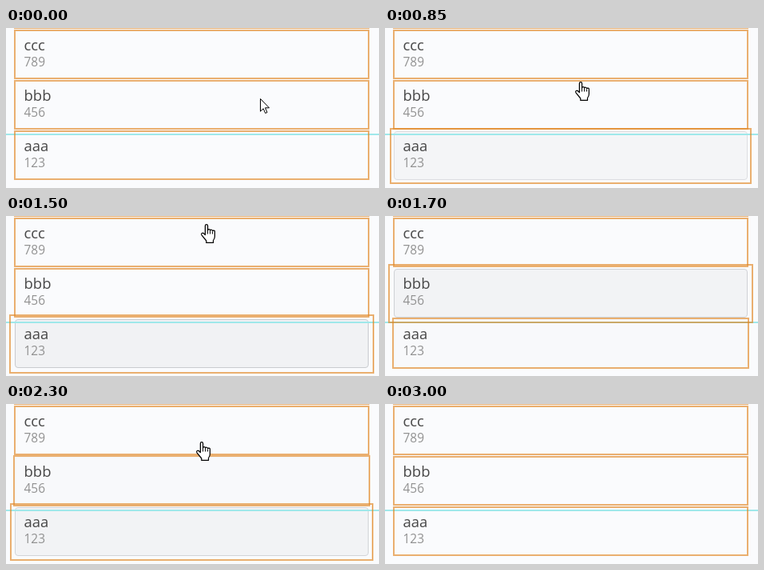
An HTML page for the animation above (3350 ms loop, 467 px wide and 200 px high).

```html
<!DOCTYPE html>
<html lang="en">
<head>
<meta charset="utf-8">
<title>Hover outlines</title>
<style>
html, body { margin: 0; width: 100%; height: 100%; overflow: hidden; background: #fafbfd; }
.stage { position: relative; width: 467px; height: 200px; overflow: hidden; }
.stage * { position: absolute; box-sizing: border-box; }
.guide { left: 0; top: 132px; width: 467px; height: 2px; background: #9fe8ea; z-index: 1; }
.row { left: 10px; width: 445px; height: 62px; }
.fill { left: 1px; top: 1px; width: 443px; height: 61px; border: 1px solid #c9cbcf; border-radius: 4px; background: #f1f2f4; opacity: 0; }
.frame { inset: 0; border: 2px solid rgba(226, 136, 36, .65); z-index: 2; }
.row span { left: 12.5px; z-index: 3; line-height: 20px; white-space: nowrap; font-family: "Open Sans", "Noto Sans", sans-serif; }
.name { top: 9px; font-size: 18.5px; color: #484848; }
.code { top: 30px; font-size: 15.5px; color: #929292; }
svg { left: 0; top: 0; width: 24px; height: 28px; overflow: visible; z-index: 4; fill: #fff; stroke: #000; stroke-linejoin: round; }
</style>
</head>
<body>
<div class="stage">
  <div class="guide"></div>
  <svg id="arrow"><path d="M.5 .5V16.2L4.2 12.8L6.7 18.5L9 17.5L6.5 11.8H11.5Z"/></svg>
  <svg id="hand">
    <path stroke-width="1.2" d="M5.4 13.5V2.3a1.6 1.6 0 0 1 3.2 0V8a1.5 1.5 0 0 1 3 .4a1.5 1.5 0 0 1 3 .7a1.4 1.4 0 0 1 2.8 .9v5.5q0 2.6-1.9 5V23.4H6.8V21L1 13.8q-1-2 1-2.6q1.2 0 3.4 2.3Z"/>
    <path d="M8.6 8v4.5M11.6 9v3.5M14.6 10v2.5" fill="none"/>
  </svg>
</div>
<script>
const LOOP = 3350, STEP = 50, FADE = 300, GROW = 6;

// switches: alternating times at which hover begins and ends
const rows = [
  { top: -61, name: "", code: "", switches: [] },
  { top: 2, name: "ccc", code: "789", switches: [] },
  { top: 65, name: "bbb", code: "456", switches: [1530, 2130] },
  { top: 128, name: "aaa", code: "123", switches: [745, 1520, 2150, 2650] },
];

// pointer strokes: [time, x, y]; it is off stage between them
const strokes = [
  [[0, 318, 88], [300, 318, 88], [550, 292, 83], [750, 252, 69], [850, 244, 67],
   [1050, 245, 57], [1300, 245, 57], [1500, 250, 10]],
  [[2100, 250, 2], [2300, 244, 47], [2450, 243, 57], [2600, 236, 70],
   [2750, 132, 97], [2850, 66, 113], [2950, 10, 127]],
];
const handSpans = [[745, 1550], [2100, 2650]];

const stage = document.querySelector(".stage");
const arrow = document.getElementById("arrow");
const hand = document.getElementById("hand");

function add(parent, tag, className, text = "") {
  const el = document.createElement(tag);
  el.className = className;
  el.textContent = text;
  return parent.appendChild(el);
}

for (const row of rows) {
  const el = add(stage, "div", "row");
  el.style.top = row.top + "px";
  row.fill = add(el, "div", "fill");
  row.frame = add(el, "div", "frame");
  add(el, "span", "name", row.name);
  add(el, "span", "code", row.code);
}

// cubic-bezier(.25, .1, .25, 1)
function ease(x) {
  if (x <= 0 || x >= 1) return x <= 0 ? 0 : 1;
  let lo = 0, hi = 1;
  for (let i = 0; i < 24; i++) {
    const s = (lo + hi) / 2;
    if (.75 * s * (1 - s) + s ** 3 < x) lo = s; else hi = s;
  }
  return .3 * lo * (1 - lo) ** 2 + 3 * lo * lo * (1 - lo) + lo ** 3;
}

function hoverAmount(switches, t) {
  const last = switches.filter(s => s <= t).length - 1;
  if (last < 0) return 0;
  const p = ease((t - switches[last]) / FADE);
  return last % 2 ? 1 - p : p;
}

function pointerAt(t) {
  for (const stroke of strokes) {
    for (let i = 1; i < stroke.length; i++) {
      const [t0, x0, y0] = stroke[i - 1], [t1, x1, y1] = stroke[i];
      if (t < t0 || t > t1) continue;
      const k = (t - t0) / (t1 - t0);
      return [Math.round(x0 + (x1 - x0) * k), Math.round(y0 + (y1 - y0) * k)];
    }
  }
  return null;
}

function place(el, visible, x, y) {
  el.style.display = visible ? "block" : "none";
  el.style.transform = `translate(${x}px, ${y}px)`;
}

function render(t) {
  for (const { switches, fill, frame } of rows) {
    const amount = hoverAmount(switches, t);
    const offset = Math.ceil(GROW * amount - 1e-6);
    const shift = offset > 3 ? 1 : 0;
    fill.style.opacity = amount;
    frame.style.inset = `${shift - offset}px ${-offset}px ${-offset - shift}px`;
  }
  const pointer = pointerAt(t);
  const [x, y] = pointer || [0, 0];
  const isHand = handSpans.some(([from, to]) => t >= from && t < to);
  place(arrow, pointer && !isHand, x, y);
  place(hand, pointer && isHand, x - 6, y);
}

const start = performance.now();
function tick() {
  const t = (performance.now() - start) % LOOP;
  render(Math.floor(t / STEP) * STEP);
  requestAnimationFrame(tick);
}
tick();
</script>
</body>
</html>
```
